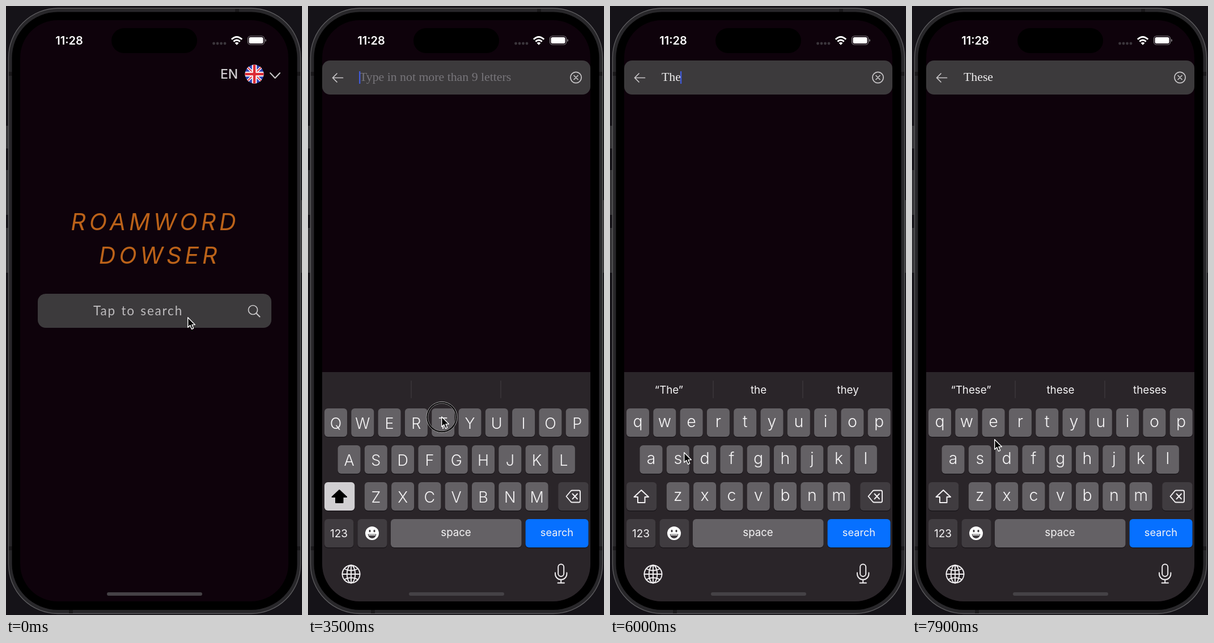
These frames come from a looping animation (522 by 1073 pixels, 8000 ms). An HTML page:

```html
<!DOCTYPE html>
<html lang="en">
<head>
<meta charset="utf-8">
<title>Word finder</title>
<style>
html, body { margin: 0; width: 100%; height: 100%; overflow: hidden; background: #151318; }
svg { display: block; width: 522px; height: 1073px; }
text { font-family: Inter, Roboto, sans-serif; }
.mid { text-anchor: middle; }
.hand { font-family: Lato, sans-serif; }
.serif { font-family: "Liberation Serif", "Noto Serif", serif; font-size: 21.8px; }
.line { fill: none; stroke: #c9c7c9; stroke-width: 1.7; stroke-linecap: round; stroke-linejoin: round; }
.icon { fill: none; stroke: #f2f0f2; stroke-width: 1.9; stroke-linecap: round; stroke-linejoin: round; }
.key { fill: #646165; }
.dark { fill: #403c40; }
.label { fill: #f5f4f5; text-anchor: middle; }
.letter { font-weight: 300; }
</style>
</head>
<body>
<svg viewBox="0 0 522 1073" xmlns="http://www.w3.org/2000/svg">
  <defs>
    <clipPath id="screen"><rect x="25" y="25" width="473" height="1024" rx="66"/></clipPath>
    <clipPath id="disc"><circle cx="438" cy="120" r="16.5"/></clipPath>
  </defs>

  <g id="phone">
    <g fill="#353437">
      <rect x="0" y="211" width="5" height="40"/>
      <rect x="0" y="289" width="5" height="79"/>
      <rect x="0" y="391" width="5" height="79"/>
      <rect x="518" y="342" width="4" height="128"/>
    </g>
    <rect x="4.5" y="4" width="515" height="1066.5" rx="87" fill="#28272a" stroke="#5d5c5f" stroke-width="1.3"/>
    <g fill="#1a191b">
      <rect x="5" y="116" width="6" height="7"/><rect x="513" y="116" width="6" height="7"/>
      <rect x="5" y="952" width="6" height="7"/><rect x="513" y="952" width="6" height="7"/>
      <rect x="404" y="5" width="7" height="6"/><rect x="111" y="1064" width="7" height="6"/>
    </g>
    <rect x="10.5" y="10.5" width="503" height="1053.5" rx="81" fill="#000"/>
    <rect x="25" y="25" width="473" height="1024" rx="66" fill="#0e020b"/>
  </g>

  <g id="home">
    <text x="378" y="128" font-size="23" font-weight="500" fill="#cfcdcf">EN</text>
    <g clip-path="url(#disc)">
      <rect x="421" y="103" width="34" height="34" fill="#2c43b4"/>
      <path d="M421 103L455 137M455 103L421 137" stroke="#fff" stroke-width="4.6"/>
      <path d="M421 103L455 137M455 103L421 137" stroke="#dc2b34" stroke-width="1.8"/>
      <path d="M438 103V137M421 120H455" stroke="#fff" stroke-width="8.4"/>
      <path d="M438 103V137M421 120H455" stroke="#dc2b34" stroke-width="4.6"/>
    </g>
    <path class="line" style="stroke-width:2" d="M466 118L474.5 127L483 118"/>
    <g class="hand mid" fill="#bb6219" font-size="41" font-style="italic" letter-spacing="6">
      <text x="263" y="394.5">ROAMWORD</text>
      <text x="271" y="453.5">DOWSER</text>
    </g>
    <rect x="56" y="507" width="412" height="60" rx="14" fill="#3c3a3c"/>
    <text class="hand mid" x="233" y="545" font-size="22.5" fill="#bdbbbd" letter-spacing="1.8" word-spacing="2">Tap to search</text>
    <path class="line" style="stroke-width:2" d="M441.2 541.2L447.5 547.5"/>
    <circle class="line" cx="435.5" cy="535.5" r="8"/>
  </g>

  <g id="search">
    <rect x="25" y="96" width="473" height="60" rx="14" fill="#3c3a3c"/>
    <path class="line" d="M61.5 126.5H43.5M51 119L43.5 126.5L51 134"/>
    <circle class="line" cx="472.5" cy="126" r="9.6"/>
    <path class="line" d="M469 122.5L476 129.5M476 122.5L469 129.5"/>
    <text id="hint" class="serif" x="91" y="132" fill="#77757a">Type in not more than 9 letters</text>
    <text id="typed" class="serif" x="91" y="132" fill="#efeeef"></text>
    <rect id="caret" y="115" width="2.4" height="22" fill="#4059d6"/>

    <rect x="25" y="645" width="473" height="404" fill="#2a2529" clip-path="url(#screen)"/>
    <path d="M182 660V691M340 660V691" stroke="#413c40" stroke-width="1.2"/>
    <g class="label" font-size="18.8">
      <text class="hintword" x="104" y="683"></text>
      <text class="hintword" x="262" y="683"></text>
      <text class="hintword" x="419.5" y="683"></text>
    </g>
    <g id="keys"></g>
    <path id="shift" d="M55.3 853L68 865H61.5V875H49V865H42.5Z" stroke-width="2" stroke-linejoin="round"/>
    <path class="icon" d="M455.5 864L463.5 854.5Q464.5 853.5 466 853.5H477.5Q480 853.5 480 856V872Q480 874.5 477.5 874.5H466Q464.5 874.5 463.5 873.5ZM466.5 859.5L475 868.5M475 859.5L466.5 868.5"/>
    <g class="label">
      <text x="54.5" y="936" font-size="19">123</text>
      <text x="261" y="934" font-size="18.6">space</text>
      <text x="439" y="934" font-size="18.2">search</text>
    </g>
    <circle cx="113" cy="929" r="12" fill="#fff"/>
    <g class="dark">
      <ellipse cx="109" cy="925" rx="1.6" ry="2.3"/><ellipse cx="117" cy="925" rx="1.6" ry="2.3"/>
      <path d="M105.5 930.5H120.5Q119 938 113 938Q107 938 105.5 930.5Z"/>
    </g>
    <path d="M107 932H119" stroke="#fff" stroke-width="1.4"/>
    <g class="icon">
      <circle cx="76" cy="1001" r="15.5"/><ellipse cx="76" cy="1001" rx="7.3" ry="15.5"/>
      <path d="M76 985.5V1016.5M60.5 1001H91.5M64 991.5Q76 998 88 991.5M64 1010.5Q76 1004 88 1010.5"/>
      <rect x="441.2" y="983.5" width="10" height="21.5" rx="5"/>
      <path d="M436 998.5V1000.5A10.2 10.2 0 0 0 456.4 1000.5V998.5M446.2 1011V1016.5M440.5 1016.5H452"/>
    </g>
    <g id="popup">
      <path fill="#656266"/>
      <text class="label letter" font-size="43"></text>
    </g>
  </g>

  <g id="status">
    <rect x="186" y="39" width="151" height="44" rx="22" fill="#000"/>
    <text class="mid" x="111.5" y="68" font-size="20" font-weight="600" fill="#fff">11:28</text>
    <g fill="#3b363c">
      <circle cx="366.5" cy="66" r="2.4"/><circle cx="373" cy="66" r="2.4"/>
      <circle cx="379.5" cy="66" r="2.4"/><circle cx="386" cy="66" r="2.4"/>
    </g>
    <path d="M397.8 58.8Q407 50.3 416.2 58.8M401.3 62.6Q407 57.6 412.7 62.6" fill="none" stroke="#fff" stroke-width="2.9"/>
    <path d="M403.6 65.2Q407 62.4 410.4 65.2L407 68.7Z" fill="#fff"/>
    <rect x="426.5" y="53" width="29" height="15" rx="4.6" fill="none" stroke="#858286" stroke-width="1.2"/>
    <rect x="428.5" y="55" width="25" height="11" rx="2.8" fill="#fff"/>
    <path d="M457 58V63Q459 62.5 459 60.5Q459 58.5 457 58Z" fill="#858286"/>
    <rect x="178" y="1033" width="168" height="6" rx="3" fill="#454246"/>
  </g>

  <g id="pointer">
    <g id="ring" fill="none">
      <circle cx="1" cy="1.5" r="25.8" stroke="#000" stroke-width="3.4"/>
      <circle cx="1" cy="1.5" r="27.2" stroke="#c4c2c4" stroke-width=".9"/>
      <circle cx="1" cy="1.5" r="24.4" stroke="#aaa8aa" stroke-width=".8"/>
    </g>
    <path d="M.7 .8V18.3L4.8 14.6L7.5 21.3L10.6 20L7.9 13.6H13.3Z" fill="#000" stroke="#fff" stroke-width="1.4" stroke-linejoin="round"/>
  </g>
</svg>

<script>
const LOOP = 8000, STEP = 100, OPEN = 1700, PITCH = 47.3;
const rows = [["QWERTYUIOP", 29, 709], ["ASDFGHJKL", 52.5, 774], ["ZXCVBNM", 99.8, 839]];

// time, x, y of the pointer tip
const path = [
  [0, 320, 548], [399, 320, 548], [400, 319, 548], [2200, 319, 548],
  [3100, 235, 723], [3800, 235, 723], [4300, 310, 794], [4600, 310, 794],
  [5300, 142, 735], [5600, 142, 735], [6000, 130, 786], [6100, 122, 793],
  [6500, 122, 793], [6600, 131, 755], [6800, 141, 736], [7100, 142, 736],
  [7900, 145, 763]
];
const rings = [[600, 900], [3500, 3700], [4300, 4400], [5300, 5500], [6300, 6400], [6900, 7000]];
const presses = [
  [3600, 3900, "T"], [4400, 4600, "H"], [5400, 5700, "E"],
  [6400, 6500, "S"], [7000, 7200, "E"]
];
const words = [[OPEN, ""], [3900, "T"], [4600, "Th"], [5700, "The"], [6500, "Thes"], [7200, "These"]];
const hints = [
  [OPEN, "", "", ""], [3900, "“T”", "the", "to"], [4800, "“Th”", "the", "this"],
  [5700, "“The”", "the", "they"], [6500, "“Thes”", "these", "thesis"],
  [7200, "“These”", "these", "theses"]
];
const blinks = [1800, 3000, 3400, 3900, 4600, 5700, 6500, 7200];

const $ = id => document.getElementById(id);
const show = (el, on) => { el.style.display = on ? "" : "none"; };
const last = (table, t) => table.filter(r => r[0] <= t).pop();
const during = (table, t) => table.find(r => t >= r[0] && t < r[1]);

const spots = {};
function cap(x, y, w, cls, fill) {
  const box = `x="${x}" width="${w}" height="50" rx="6"`;
  return `<rect ${box} y="${y + 1.3}" fill="#171418"/>` +
    `<rect ${box} y="${y}" class="${cls}"${fill ? ` fill="${fill}"` : ""}/>`;
}
let markup = "";
for (const [letters, x0, y] of rows) {
  [...letters].forEach((c, i) => {
    const x = x0 + i * PITCH;
    spots[c] = [x, y];
    markup += cap(x, y, 40, "key") + `<text class="label letter" data-c="${c}" x="${x + 20}"></text>`;
  });
}
markup += cap(29, 839, 53.3, "shift") + cap(441.2, 839, 53.3, "dark") + cap(29, 904, 51.3, "dark") +
  cap(87.5, 904, 52, "dark") + cap(146, 904, 230.5, "key") + cap(383.6, 904, 110.9, "go", "#0670ff");
$("keys").innerHTML = markup;
const labels = [...document.querySelectorAll("[data-c]")];
const shiftKey = document.querySelector(".shift");
const hintWords = [...document.querySelectorAll(".hintword")];

function setCase(upper) {
  for (const el of labels) {
    const c = el.dataset.c, y = spots[c][1];
    el.textContent = upper ? c : c.toLowerCase();
    el.setAttribute("y", y + (upper ? 35.5 : 32.5));
    el.setAttribute("font-size", upper ? 27 : 28.5);
  }
  shiftKey.setAttribute("fill", upper ? "#d1cfd2" : "#403c40");
  $("shift").setAttribute("fill", upper ? "#000" : "none");
  $("shift").setAttribute("stroke", upper ? "#000" : "#f2f0f2");
}

function setPopup(press, upper) {
  show($("popup"), press);
  if (!press) return;
  const [x, y] = spots[press[2]], [shape, text] = $("popup").children;
  shape.setAttribute("d", `M${x - 16} ${y - 66}q0 -12 12 -12h48q12 0 12 12v40
    c0 15 -16 14 -16 30v40q0 6 -6 6h-28q-6 0 -6 -6v-40c0 -16 -16 -15 -16 -30z`);
  text.textContent = upper ? press[2] : press[2].toLowerCase();
  text.setAttribute("x", x + 19.5);
  text.setAttribute("y", y - 28);
}

function pointerAt(t) {
  const i = path.findIndex(p => p[0] > t);
  if (i < 0) return path[path.length - 1].slice(1);
  const [t0, x0, y0] = path[i - 1], [t1, x1, y1] = path[i];
  const u = (t - t0) / (t1 - t0), e = u * u * (3 - 2 * u);
  return [x0 + (x1 - x0) * e, y0 + (y1 - y0) * e];
}

function caretAlpha(t) {
  const since = blinks.filter(b => b <= t).pop();
  if (since === undefined) return 0;
  const d = (t - since) % 1000;
  if (d < 500) return 1;
  if (d < 650) return (650 - d) / 150;
  return d < 850 ? 0 : (d - 850) / 150;
}

function draw(t) {
  const open = t >= OPEN;
  show($("home"), !open);
  show($("search"), open);
  show($("ring"), during(rings, t));
  $("pointer").setAttribute("transform", `translate(${pointerAt(t)})`);
  if (!open) return;

  const word = last(words, t)[1], upper = !word;
  $("typed").textContent = word;
  show($("hint"), upper);
  $("caret").setAttribute("x", 90 + (word ? $("typed").getComputedTextLength() : 0));
  $("caret").setAttribute("opacity", caretAlpha(t));
  const row = last(hints, t);
  hintWords.forEach((el, i) => { el.textContent = row[i + 1]; });
  setCase(upper);
  setPopup(during(presses, t), upper);
}

let shown = -1;
function tick() {
  const t = Math.floor(performance.now() % LOOP / STEP) * STEP;
  if (t !== shown) draw(shown = t);
  requestAnimationFrame(tick);
}
tick();
</script>
</body>
</html>
```
